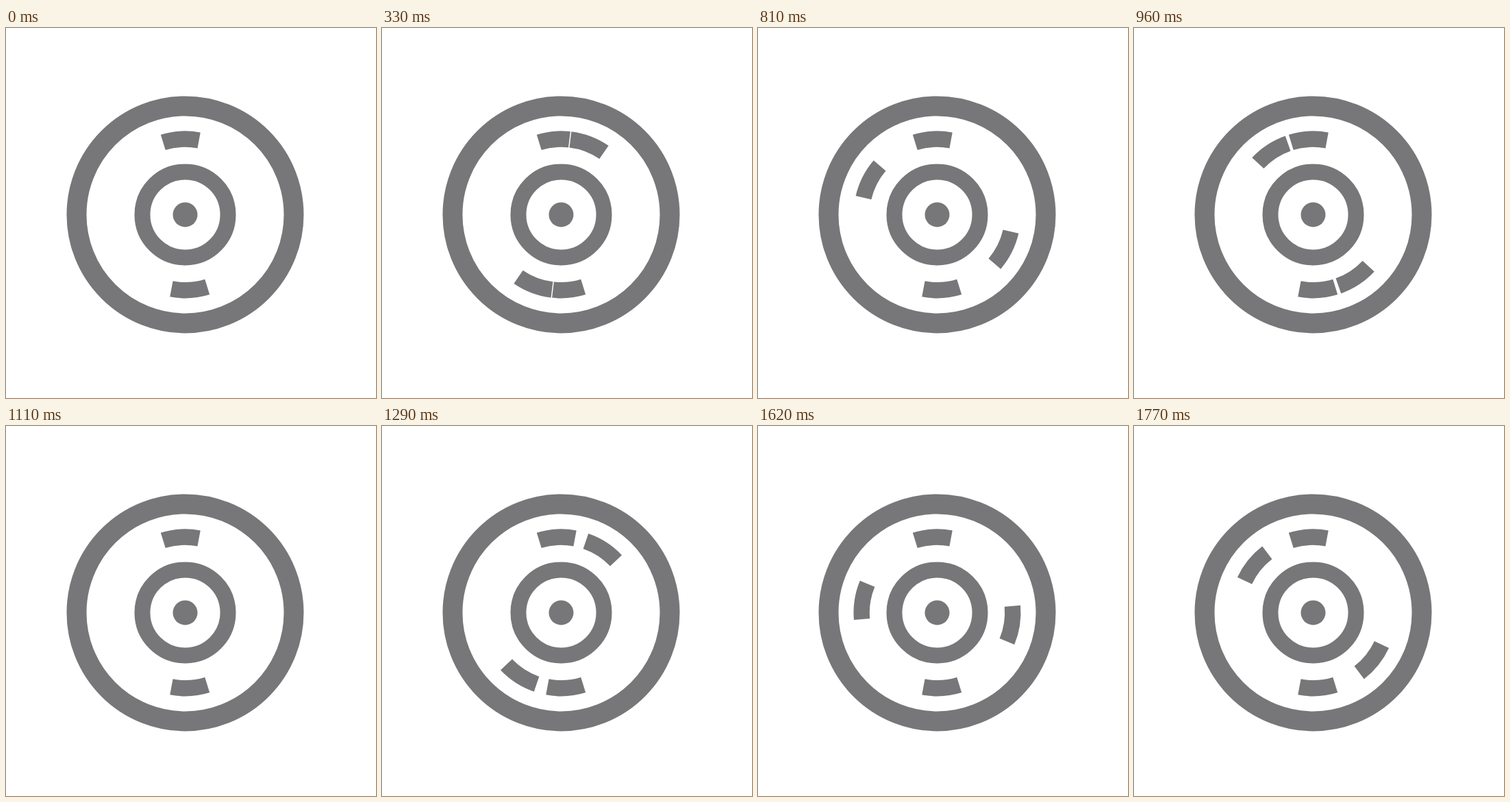
These frames come from a looping animation (540 px wide and 540 px high, 1800 ms). An HTML page:

```html
<!DOCTYPE html>
<html>
<head>
<meta charset="utf-8">
<title>Spinning disc</title>
<style>
  html, body { margin: 0; width: 100%; height: 100%; overflow: hidden; background: #fff; }
  svg { display: block; width: 100vw; height: 100vh; }
</style>
</head>
<body>
<svg viewBox="0 0 540 540">
  <defs>
    <path id="dash" d="M-29-118.5A122 122 0 0 1 29-118.5L23.4-95.8A98.6 98.6 0 0 0-23.4-95.8Z"/>
    <g id="pair" transform="rotate(-3.25)">
      <use href="#dash"/>
      <use href="#dash" transform="rotate(180)"/>
    </g>
  </defs>
  <g transform="translate(261.5 272.4)" fill="#777779">
    <g fill="none" stroke="#777779">
      <circle r="158.5" stroke-width="29"/>
      <circle r="62.5" stroke-width="23"/>
    </g>
    <circle r="18"/>
    <use href="#pair"/>
    <!-- the white edge separates the moving pair from the fixed one -->
    <g id="spinner" stroke="#fff" stroke-width="3" paint-order="stroke">
      <use href="#pair"/>
    </g>
  </g>
</svg>
<script>
  const LOOP = 1800, STEP = 30, REST = 210, SPEED = 0.2; // ms, ms, ms, degrees per ms
  const spinner = document.getElementById('spinner');
  const start = performance.now();

  function draw(now) {
    const elapsed = Math.max(0, now - start) % LOOP;
    const time = Math.floor(elapsed / STEP) * STEP;
    const angle = Math.max(0, time - REST) * SPEED;
    spinner.setAttribute('transform', `rotate(${angle})`);
    requestAnimationFrame(draw);
  }
  draw(start);
</script>
</body>
</html>
```
